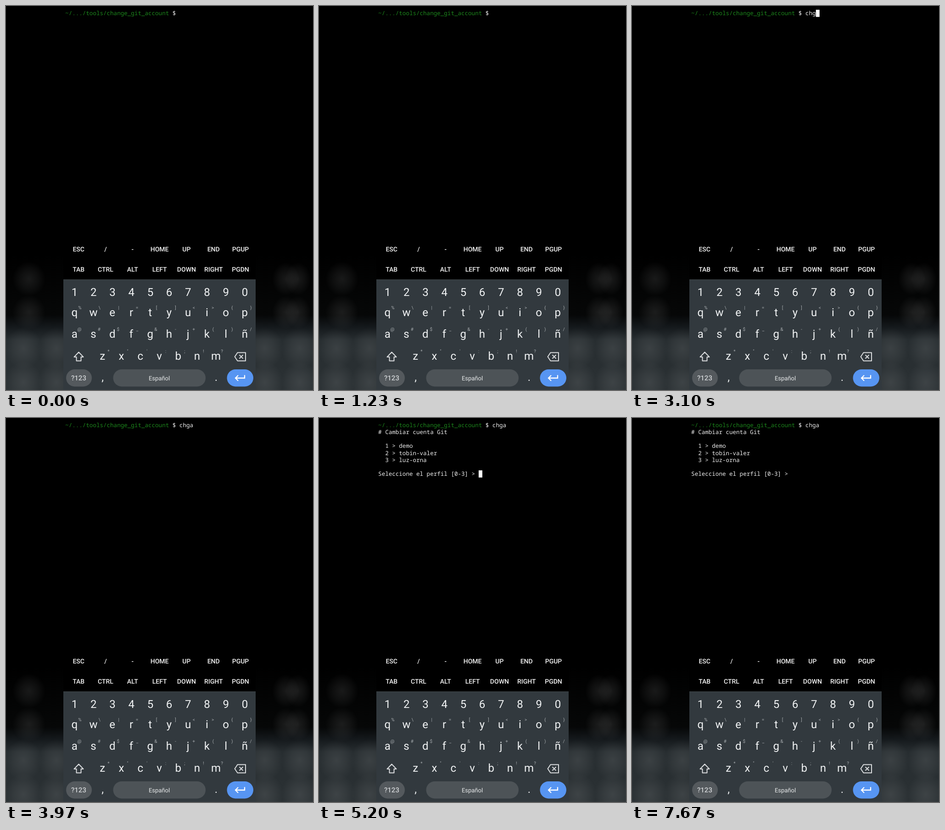
An HTML page that plays this animation: 669x837 px, repeating every 8000 ms.

```html
<!DOCTYPE html>
<html lang="es">
<head>
<meta charset="utf-8">
<style>
  html, body { margin: 0; width: 100%; height: 100%; overflow: hidden; background: #000; }
  svg { display: block; font-family: Roboto, sans-serif; text-rendering: geometricPrecision; }
  text { white-space: pre; }
  .term { font: 12.575px "Noto Sans Mono", monospace; fill: #eee; }
  .path { fill: #1c861c; }
  .mid { text-anchor: middle; }
  .extra { font-size: 14px; font-weight: 500; fill: #f4f4f4; }
  .key { font-size: 24px; fill: #f1f3f4; }
  .hint { font-size: 10px; fill: #a6abae; text-anchor: end; }
  .icon { fill: none; stroke: #dadcde; stroke-width: 2; stroke-linejoin: round; }
</style>
</head>
<body>
<svg id="stage" width="669" height="837" viewBox="0 0 669 837">
  <defs>
    <linearGradient id="fade" x1="0" y1="0" x2="0" y2="1">
      <stop offset="0" stop-color="#000"/>
      <stop offset=".45" stop-color="#060707"/>
      <stop offset=".53" stop-color="#13171a"/>
      <stop offset=".63" stop-color="#272d30"/>
      <stop offset="1" stop-color="#2b3134"/>
    </linearGradient>
    <radialGradient id="glow">
      <stop offset="0" stop-color="#fff" stop-opacity=".09"/>
      <stop offset=".5" stop-color="#fff" stop-opacity=".05"/>
      <stop offset="1" stop-color="#fff" stop-opacity="0"/>
    </radialGradient>
  </defs>
  <rect width="669" height="837"/>
  <rect y="540" width="669" height="297" fill="url(#fade)"/>
  <g id="glows" fill="url(#glow)"></g>
  <rect x="125" width="419" height="597"/>
  <rect x="125" y="596" width="419" height="241" fill="#32393e"/>
  <rect x="125" y="596" width="419" height="1" fill="#41484c"/>
  <g id="keys"></g>
  <rect x="131" y="792" width="56" height="37.5" rx="18.7" fill="#54595d"/>
  <rect x="233.5" y="792" width="201.5" height="37.5" rx="18.7" fill="#4d5357"/>
  <rect x="481.5" y="792" width="57.5" height="37.5" rx="18.7" fill="#5795f2"/>
  <text class="mid" x="158.5" y="816" font-size="15" font-weight="500" fill="#cfd2d4">?123</text>
  <text class="mid" x="334" y="815.5" font-size="13" fill="#e8eaeb">Español</text>
  <text class="mid key" x="210.5" y="817">,</text>
  <text class="mid key" x="458" y="817">.</text>
  <path class="icon" d="M158.5 754.5 L148.5 765 H153.5 V773.5 H163.5 V765 H168.5 Z"/>
  <path class="icon" d="M504.5 755.5 H522 V773.5 H504.5 L498.5 764.5 Z M508.5 760.5 l8 8 m0 -8 l-8 8"/>
  <path class="icon" d="M520 804.5 V811 H500.5 M506 805 L500 811 L506 817" style="stroke:#fff;stroke-width:2.3;stroke-linejoin:miter"/>
  <g id="popup">
    <rect x="-18" y="-67" width="36" height="86" rx="8" fill="#596064"/>
    <text class="mid key" y="-33"></text>
  </g>
  <text class="term" x="129.1" y="20"><tspan class="path">~/.../tools/change_git_account</tspan> $ <tspan id="typed"></tspan></text>
  <g id="menu"></g>
  <rect id="cursor" width="8" height="15.6" fill="#fff"/>
</svg>
<script>
const $ = id => document.getElementById(id);
const LEFT = 129.1, CHAR = 7.545, LINE = 15.13, PITCH = 41.22;

function add(parent, tag, attrs, content = '') {
  const el = document.createElementNS('http://www.w3.org/2000/svg', tag);
  for (const name in attrs) el.setAttribute(name, attrs[name]);
  el.textContent = content;
  $(parent).append(el);
}

// Soft shapes in the side margins
const glow = (cx, cy, rx, ry) => add('glows', 'ellipse', { cx, cy, rx, ry });
for (const y of [595, 668]) {
  glow(50, y, 36, 38);
  glow(610, y, 30, 36);
  glow(636, y, 28, 36);
}
for (const y of [746, 820])
  for (const x of [38, 110, 564, 640]) glow(x, y, 40, 46);

// Extra key rows
['ESC / - HOME UP END PGUP', 'TAB CTRL ALT LEFT DOWN RIGHT PGDN'].forEach((row, r) =>
  row.split(' ').forEach((label, i) =>
    add('keys', 'text', { class: 'mid extra', x: 158.2 + 58.8 * i, y: 535 + 43.5 * r }, label)));

// Letter rows, with the centre of each key kept for the popups
const centre = {};
[
  ['1234567890', '', 149.5, 632],
  ['qwertyuiop', '%\\|=[]<>{}', 149.3, 676],
  ['asdfghjklñ', '@#$_&-+()/', 149.3, 723],
  ['zxcvbnm', '*"\':;!?', 210.3, 771]
].forEach(([letters, hints, x0, y]) => [...letters].forEach((letter, i) => {
  const x = x0 + PITCH * i;
  centre[letter] = [x, y - 7];
  add('keys', 'text', { class: 'mid key', x, y }, letter);
  if (hints) add('keys', 'text', { class: 'hint', x: x + 15.3, y: y - 15.5 }, hints[i]);
}));

// Program output, by line number
const QUESTION = 'Seleccione el perfil [0-3] > ';
const output = ['# Cambiar cuenta Git', '', '  1 > demo', '  2 > tobin-valer', '  3 > luz-orna', '', QUESTION];
output.forEach((line, i) =>
  add('menu', 'text', { class: 'term', x: LEFT, y: 20 + LINE * (i + 1) }, line));

const LOOP = 8000, RUN = 5100, HOLD = 90;
const presses = [['c', 2270], ['h', 2690], ['g', 3005], ['a', 3330]];

function draw(t) {
  const typed = presses.filter(([, at]) => t >= at + HOLD).map(([letter]) => letter).join('');
  $('typed').textContent = typed;

  const down = presses.find(([, at]) => t >= at && t < at + HOLD);
  $('popup').style.display = down ? '' : 'none';
  if (down) {
    $('popup').setAttribute('transform', `translate(${centre[down[0]]})`);
    $('popup').lastElementChild.textContent = down[0];
  }

  const running = t >= RUN;
  $('menu').style.display = running ? '' : 'none';

  // Blinks every 400 ms, but stays lit while typing
  const blink = Math.floor((t - 30) / 400) % 2 === 0;
  const lit = blink || (typed && t < 3630);
  const column = running ? QUESTION.length : 33 + typed.length;
  $('cursor').setAttribute('x', LEFT + CHAR * column);
  $('cursor').setAttribute('y', 8.2 + (running ? LINE * output.length : 0));
  $('cursor').style.display = lit ? '' : 'none';
}

const start = performance.now();
function tick() {
  draw((performance.now() - start) % LOOP);
  requestAnimationFrame(tick);
}
tick();
</script>
</body>
</html>
```
